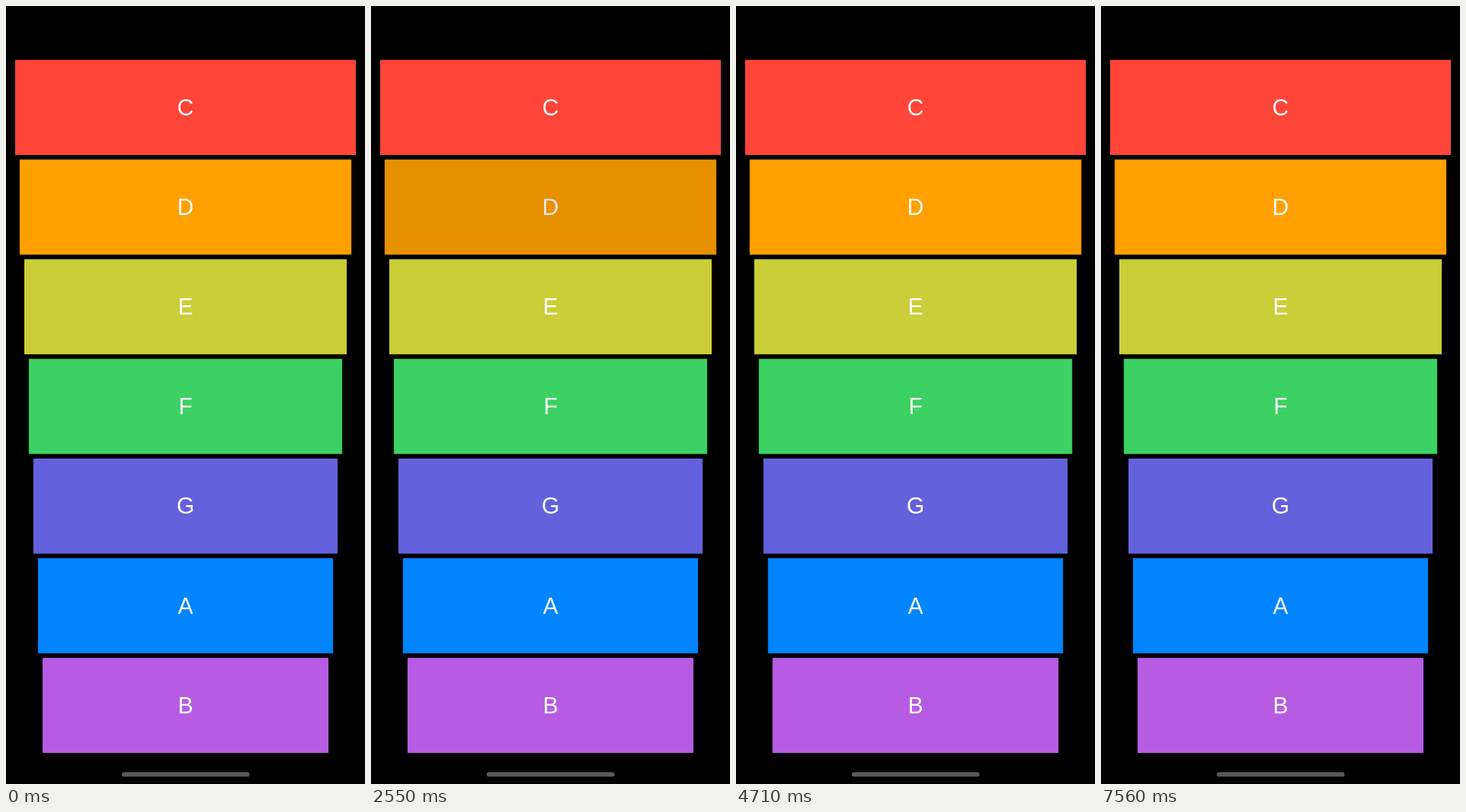
Animation of 508x1102 px, one loop 8 s. Source, as an HTML page:

```html
<!DOCTYPE html>
<html lang="en">
<head>
<meta charset="utf-8">
<title>Xylophone</title>
<style>
  html, body { margin: 0; width: 100%; height: 100%; overflow: hidden; background: #000; }
  svg { display: block; width: 508px; height: 1102px; }
  text { font: 32.3px "Liberation Sans", Arial, sans-serif; fill: #fff; text-anchor: middle; }
</style>
</head>
<body>
<svg id="stage" viewBox="0 0 508 1102"></svg>
<script>
const LOOP = 8000;
const TICK = 113.85;
const FADE = 220;         // each half of the dip, ms
const DIM = 0.5;
const PRESSED = 0.76;
const PT_X = 508 / 393, PT_Y = 1102 / 852;

const bars = [
  ['C', '#ff4538'], ['D', '#ffa000'], ['E', '#cace38'], ['F', '#3dd164'],
  ['G', '#6461dc'], ['A', '#0085ff'], ['B', '#b65ce3']
];

// touch down, touch up, start of the dip
const taps = [
  { key: 0, down: 495, up: 722, dip: 633 },
  { key: 1, down: 2200, up: 2430, dip: 2487 },
  { key: 4, down: 4130, up: 4360, dip: 4262 },
  { key: 2, down: 5610, up: 5840, dip: 5810 },
  { key: 5, down: 6980, up: 7095, dip: 7060 }
];

const stage = document.getElementById('stage');

function add(parent, tag, attrs, label) {
  const el = document.createElementNS('http://www.w3.org/2000/svg', tag);
  for (const name in attrs) el.setAttribute(name, attrs[name]);
  if (label) el.textContent = label;
  parent.appendChild(el);
  return el;
}

add(stage, 'rect', { width: 508, height: 1102, fill: '#000' });

const barHeight = (759 - 30) / 7;
const keys = bars.map(([note, fill], i) => {
  const inset = 10 + 5 * i;
  const y = (59 + (barHeight + 5) * i) * PT_Y;
  const height = barHeight * PT_Y;
  const group = add(stage, 'g', {});
  add(group, 'rect', { x: inset * PT_X, y, width: (393 - 2 * inset) * PT_X, height, fill });
  const label = add(group, 'text', { x: 254, y: y + height / 2 + 11.1 }, note);
  return { group, label };
});

add(stage, 'rect', { x: 163.8, y: 1085.2, width: 180.8, height: 6.4, rx: 3.2, fill: '#5a5a5a' });

const ease = p => (1 - Math.cos(Math.PI * p)) / 2;

function dipAlpha(age) {
  const depth = 1 - Math.abs(age - FADE) / FADE;
  return depth > 0 ? 1 - (1 - DIM) * ease(depth) : 1;
}

function draw(ms) {
  const step = Math.floor((ms % LOOP - 493) / TICK);
  const t = 500 + step * TICK;
  for (const { key, down, up, dip } of taps) {
    const { group, label } = keys[key];
    group.setAttribute('opacity', dipAlpha(t - dip));
    label.setAttribute('opacity', t >= down && t < up ? PRESSED : 1);
  }
}

const start = performance.now();
function loop() {
  draw(performance.now() - start);
  requestAnimationFrame(loop);
}
loop();
</script>
</body>
</html>
```
